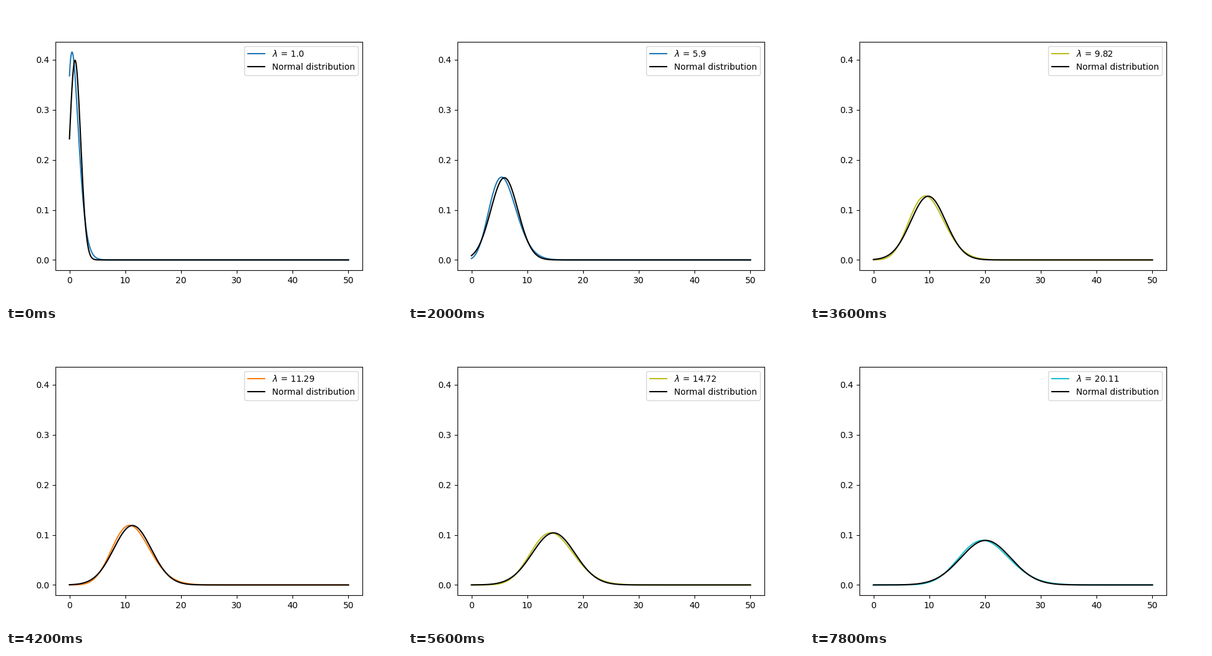
Animation of 640 by 480 pixels, one loop 8000 ms. Source, as a matplotlib script:

```python
import math

import matplotlib.pyplot as plt
import numpy as np
from matplotlib.animation import FuncAnimation

FRAMES = 40
STEP = 0.49

x = np.linspace(0, 50, 1000)
log_fact = np.array([math.lgamma(v + 1) for v in x])


def poisson(lam):
    return np.exp(x * math.log(lam) - lam - log_fact)


def normal(lam):
    return np.exp(-(x - lam) ** 2 / (2 * lam)) / math.sqrt(2 * math.pi * lam)


def label(lam):
    return rf"$\lambda$ = {round(lam, 2)}"


fig, ax = plt.subplots(figsize=(6.4, 4.8), dpi=100)
curve, = ax.plot(x, poisson(1), color="C0", label=label(1.0))
bell, = ax.plot(x, normal(1), color="black", label="Normal distribution")
legend = ax.legend(loc="upper right")
key = legend.get_lines()[0]
caption = legend.get_texts()[0]

# Keep the limits of the first, tallest curve
ax.set_xlim(ax.get_xlim())
ax.set_ylim(ax.get_ylim())


def update(i):
    lam = 1 + STEP * i
    color = f"C{i % 10}"
    curve.set_ydata(poisson(lam))
    curve.set_color(color)
    bell.set_ydata(normal(lam))
    key.set_color(color)
    caption.set_text(label(lam))
    return curve, bell, legend


anim = FuncAnimation(fig, update, frames=FRAMES, interval=200,
                     repeat=True, repeat_delay=0)
plt.show()
```
